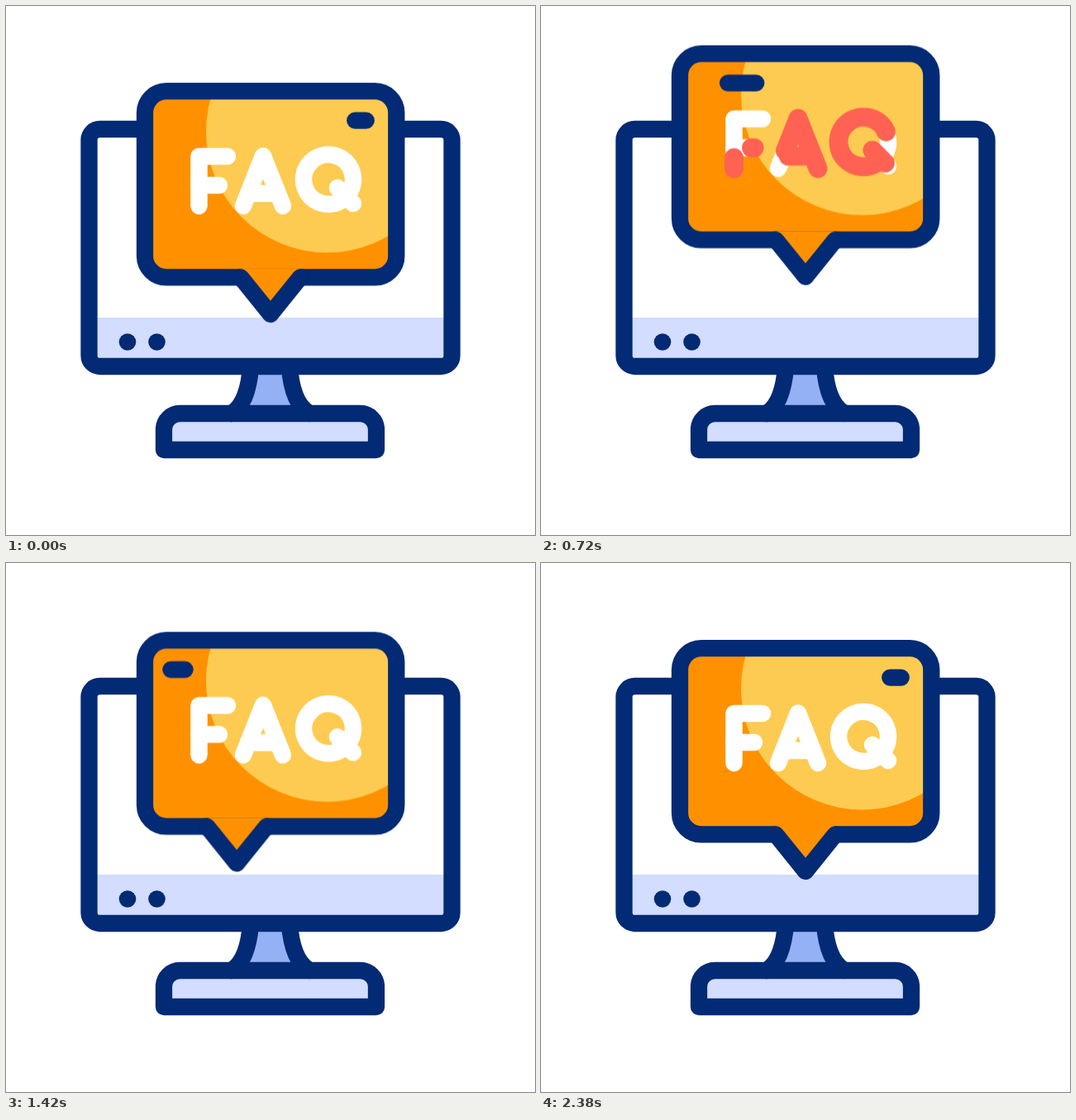
Animation of 640x640 px, one loop 2400 ms. Source, as an HTML page:

```html
<!DOCTYPE html>
<html lang="en">
<head>
<meta charset="utf-8">
<title>FAQ</title>
<style>
  @property --s { syntax: "<number>"; inherits: true; initial-value: 0; }
  @property --e { syntax: "<number>"; inherits: true; initial-value: 0; }

  :root {
    --navy: #032a74;
    --pale: #d2ddff;
    --loop: 2400ms;
    --ease: cubic-bezier(.333, 0, .667, 1);
    --snap: cubic-bezier(1, 0, 0, 1);
  }
  html, body { margin: 0; width: 100%; height: 100%; overflow: hidden; background: #fff; }
  svg { display: block; width: 100%; height: 100%; }

  .line { fill: none; stroke: var(--navy); stroke-width: 20.3; stroke-linecap: round; stroke-linejoin: round; }
  .text { fill: none; stroke: #fff; stroke-width: 20.5; stroke-linecap: round; stroke-linejoin: round; }

  /* shows a stroke only from --s to --e */
  .trim {
    stroke-dasharray: calc((var(--e) - var(--s)) * 1px) 999px;
    stroke-dashoffset: calc(var(--s) * -1px);
  }

  .bubble { animation: float var(--loop) var(--ease) infinite; }
  .tail { animation: slide var(--loop) var(--ease) infinite; }
  .dash { animation: dash-left var(--loop) var(--snap) infinite, dash-right var(--loop) var(--snap) infinite; }
  .red {
    stroke: #ff6252;
    stroke-width: 23;
    animation: wipe-start var(--loop) var(--ease) infinite both,
               wipe-end var(--loop) var(--ease) infinite both,
               show var(--loop) step-end infinite both;
    animation-delay: calc(var(--i) * 155ms);
  }

  @keyframes float {
    0% { transform: translateY(0); animation-timing-function: cubic-bezier(.333, .667, .667, 1); }
    28.75% { transform: translateY(-46px); }
    49.17%, 50.67% { transform: translateY(0); }
    79.6% { transform: translateY(-46px); }
    90%, 100% { transform: translateY(0); }
  }
  @keyframes slide {
    0%, 41.67% { transform: translateX(0); }
    70.4% { transform: translateX(-61.6px); }
    98.75%, 100% { transform: translateX(0); }
  }
  @keyframes dash-left {
    0% { --s: 223; }
    50.8%, 57.5% { --s: 0; }
    100% { --s: 223; }
  }
  @keyframes dash-right {
    0%, 5.2% { --e: 236.5; }
    51.67% { --e: 14.5; }
    95%, 100% { --e: 236.5; }
  }
  @keyframes wipe-end {
    0%, 7.83% { --e: 0; }
    20.75%, 100% { --e: 100; }
  }
  @keyframes wipe-start {
    0%, 20.13% { --s: 0; }
    33.04%, 100% { --s: 100; }
  }
  @keyframes show {
    0% { opacity: 0; }
    7.83% { opacity: 1; }
    33.04%, 100% { opacity: 0; }
  }
</style>
</head>
<body>
<svg viewBox="0 0 640 640" role="img" aria-label="FAQ">
  <defs>
    <clipPath id="body"><rect x="168" y="103" width="304.5" height="225.5" rx="26"/></clipPath>
    <g id="F">
      <path pathLength="100" d="M268 182H233.5V242"/>
      <path pathLength="100" d="M233.5 217H258"/>
    </g>
    <g id="A">
      <path pathLength="100" d="M287 242L311 181.5L335 242"/>
      <path pathLength="100" d="M293 227H329"/>
    </g>
    <g id="Q">
      <path pathLength="100" d="M411.2 231.2A30 30 0 1 1 411.3 231.1"/>
      <path pathLength="100" d="M401 220L420 239"/>
    </g>
  </defs>

  <!-- stand -->
  <path fill="#93b1f4" d="M296 436C294 465 287 484 272 493H368C353 484 346 465 344 436Z"/>
  <path class="line" style="fill:var(--pale)" d="M191 537V512.5A19.5 19.5 0 0 1 210.5 493H428.5A19.5 19.5 0 0 1 448 512.5V537Z"/>
  <path class="line" d="M296 436C294 465 287 484 273 493M343 436C345 465 352 484 367 493"/>

  <!-- screen -->
  <rect x="100.5" y="149" width="439" height="287" rx="13" fill="#fff"/>
  <rect x="105" y="377" width="430" height="55" fill="var(--pale)"/>
  <rect class="line" x="100.5" y="149" width="439" height="287" rx="13"/>
  <g fill="var(--navy)">
    <circle cx="147" cy="406.5" r="10.3"/>
    <circle cx="182.5" cy="406.5" r="10.3"/>
  </g>

  <!-- speech bubble -->
  <g class="bubble">
    <g clip-path="url(#body)">
      <rect x="168" y="103" width="305" height="226" fill="#ff9100"/>
      <circle cx="388.5" cy="152" r="146.5" fill="#fdcb51"/>
    </g>
    <rect class="line" x="168" y="103.2" width="304.3" height="225.2" rx="26"/>
    <g class="tail">
      <path fill="#ff9100" d="M284 318V328.4L320 373L356 328.4V318Z"/>
      <path class="line" d="M284 328.4L320 373L356 328.4"/>
    </g>
    <path class="line trim dash" d="M199.25 138.6H435.75"/>
    <g class="text">
      <use href="#F"/>
      <use href="#A"/>
      <use href="#Q"/>
    </g>
    <g class="text">
      <g class="trim red" style="--i:0"><use href="#F"/></g>
      <g class="trim red" style="--i:1"><use href="#A"/></g>
      <g class="trim red" style="--i:2"><use href="#Q"/></g>
    </g>
  </g>
</svg>
</body>
</html>
```
